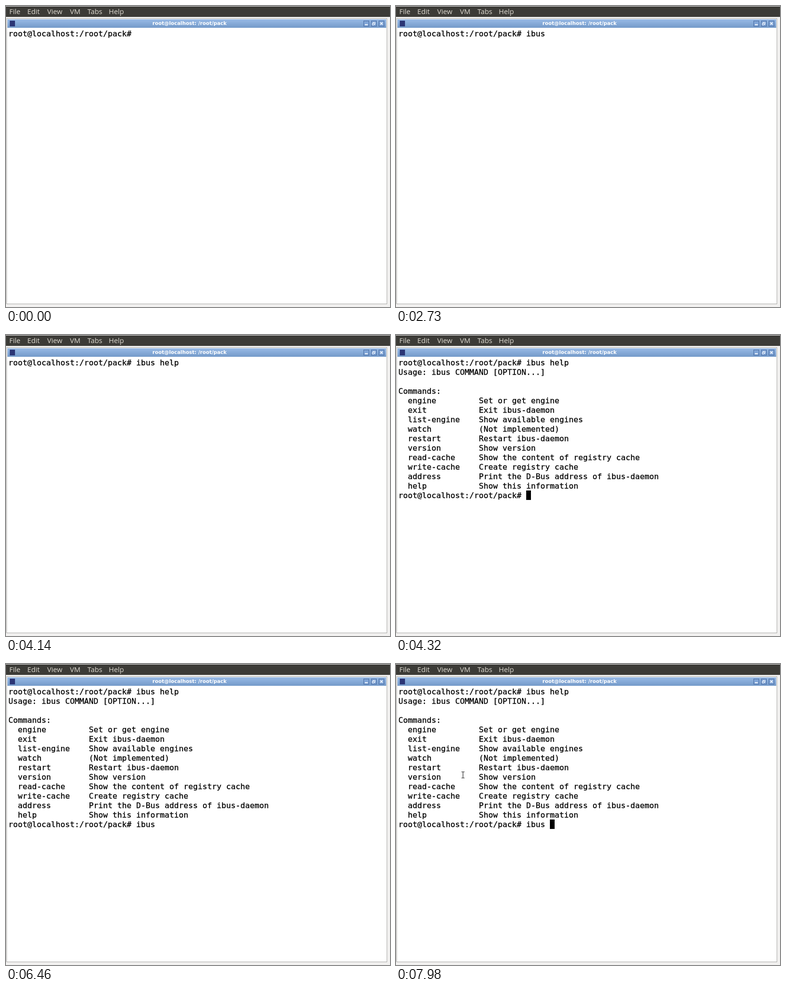
An HTML page for the animation above (8 s loop, 811 by 635 pixels).

```html
<!DOCTYPE html>
<html lang="en">
<head>
<meta charset="utf-8">
<title>Terminal</title>
<style>
  html, body { margin: 0; width: 100%; height: 100%; overflow: hidden; background: #f2f1f0; }
  svg { display: block; width: 811px; height: 635px; }
  text { white-space: pre; }
  .menu { font: 14.8px "Open Sans", "Noto Sans", sans-serif; fill: #dfdbd2; }
  .title { font: bold 10.5px "DejaVu Sans", sans-serif; fill: #fff; text-anchor: middle; }
  .term { font: 16.61px "DejaVu Sans Mono", monospace; fill: #000; stroke: #000; stroke-width: .3px; }
  .box { fill: #7fa4d6; stroke: #45689f; }
  .mark { fill: none; stroke: #fff; }
</style>
</head>
<body>
<svg viewBox="0 0 811 635">
  <defs>
    <linearGradient id="bar" x2="0" y2="1">
      <stop stop-color="#98bae6"/>
      <stop offset="1" stop-color="#749ac9"/>
    </linearGradient>
  </defs>
  <rect width="811" height="635" fill="#f2f1f0"/>
  <rect y="1" width="811" height="22" fill="#3c3b37"/>
  <g class="menu">
    <text x="7" y="17">File</text>
    <text x="45" y="17">Edit</text>
    <text x="87" y="17">View</text>
    <text x="135" y="17">VM</text>
    <text x="172" y="17">Tabs</text>
    <text x="217" y="17">Help</text>
  </g>
  <rect x="1.5" y="26.5" width="803" height="602" fill="#fff" stroke="#a5a5a3"/>
  <rect x="3" y="28" width="800" height="18" fill="url(#bar)"/>
  <rect x="8" y="31" width="11" height="12" fill="#2b3575"/>
  <text class="title" x="387.7" y="40">root@localhost: /root/pack</text>
  <g class="box">
    <rect x="755.5" y="31.5" width="11" height="11"/>
    <rect x="771.5" y="31.5" width="11" height="11"/>
    <rect x="787.5" y="31.5" width="11" height="11"/>
  </g>
  <g class="mark">
    <path d="M758 39.5h6" stroke-width="2"/>
    <path d="M775.5 36v-1.500h4v4h-1.500M773.500 36.500h4v3.500h-4z"/>
    <path d="M790.500 34.500l5 5m0-5l-5 5" stroke-width="1.700"/>
  </g>
  <g class="term" id="term"></g>
  <rect id="caret" width="10" height="20"/>
  <path id="pointer" fill="none" stroke="#000"
    d="M-3-6.500h2.500l.5.500.5-.500h2.500M0-6v12M-3 6.500h2.500l.5-.500.5.500h2.500"/>
</svg>
<script>
const LOOP = 8000, COL = 10, ROW = 20, LEFT = 5, TOP = 48;
const PROMPT = 'root@localhost:/root/pack# ', COMMAND = 'ibus help';
const OUTPUT = `Usage: ibus COMMAND [OPTION...]

Commands:
  engine         Set or get engine
  exit           Exit ibus-daemon
  list-engine    Show available engines
  watch          (Not implemented)
  restart        Restart ibus-daemon
  version        Show version
  read-cache     Show the content of registry cache
  write-cache    Create registry cache
  address        Print the D-Bus address of ibus-daemon
  help           Show this information`.split('\n');

// Caret blinks, key presses and the command run, in ms.
const EVENTS = [
  [100, 'on'], [290, 'off'], [640, 'on'], [1220, 'off'],
  [1350, 'key'], [1480, 'off'], [1780, 'on'], [1930, 'key'], [1980, 'key'],
  [2430, 'key'], [2730, 'off'], [2900, 'key'], [3070, 'off'], [3370, 'on'],
  [3410, 'key'], [3760, 'key'], [3880, 'key'], [4000, 'key'], [4120, 'off'],
  [4320, 'run'], [4570, 'off'], [4860, 'on'], [5460, 'off'],
  [5560, 'key'], [5650, 'key'], [5750, 'key'], [6100, 'off'], [6150, 'key'],
  [6460, 'off'], [6600, 'key'], [6740, 'off'], [7030, 'on'], [7630, 'off'], [7930, 'on']
];
const MOVE = { start: 7280, step: 50, count: 14, from: [386.5, 45], to: [141.5, 234.500] };

const $ = id => document.getElementById(id);
const lines = Array.from({ length: OUTPUT.length + 2 }, (_, i) => {
  const line = document.createElementNS('http://www.w3.org/2000/svg', 'text');
  line.setAttribute('x', LEFT);
  line.setAttribute('y', TOP + i * ROW + 16);
  $('term').append(line);
  return line;
});

function stateAt(time) {
  const state = { typed: 0, caret: false, ran: false };
  for (const [at, action] of EVENTS) {
    if (at > time) break;
    state.caret = action !== 'off';
    if (action === 'key') state.typed++;
    if (action === 'run') { state.ran = true; state.typed = 0; }
  }
  return state;
}

function placePointer(time) {
  const k = Math.floor((time - MOVE.start) / MOVE.step);
  $('pointer').style.display = k < 0 ? 'none' : '';
  if (k < 0) return;
  const p = Math.min(1, k / MOVE.count), ease = 1 - (1 - p) ** 1.6;
  const [x, y] = MOVE.from.map((v, i) => v + (MOVE.to[i] - v) * ease);
  $('pointer').setAttribute('transform',
    `translate(${Math.floor(x) + .5} ${Math.floor(y)})`);
}

function draw() {
  const time = performance.now() % LOOP;
  const { typed, caret, ran } = stateAt(time);
  const input = PROMPT + COMMAND.slice(0, typed);
  const shown = ran ? [PROMPT + COMMAND, ...OUTPUT, input] : [input];
  lines.forEach((line, i) => {
    const text = shown[i] || '';
    if (line.textContent !== text) line.textContent = text;
  });
  $('caret').style.display = caret ? '' : 'none';
  $('caret').setAttribute('x', LEFT + input.length * COL);
  $('caret').setAttribute('y', TOP + (shown.length - 1) * ROW);
  placePointer(time);
  requestAnimationFrame(draw);
}
draw();
</script>
</body>
</html>
```
